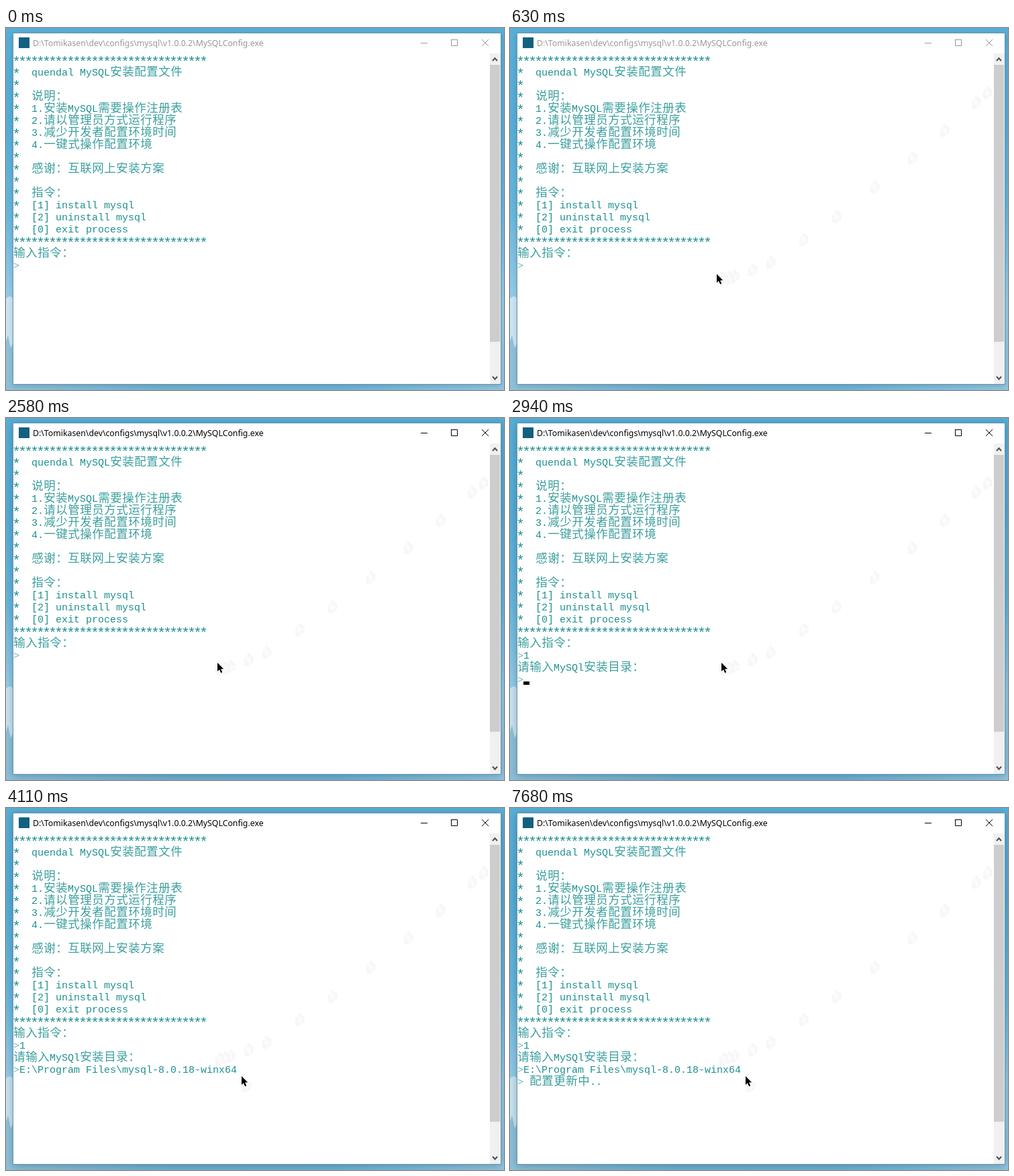
These frames come from a looping animation (742 px wide and 540 px high, 8000 ms). An HTML page with a canvas:

```html
<!DOCTYPE html>
<html lang="zh-CN">
<meta charset="utf-8">
<title>MySQLConfig</title>
<style>
html, body { margin: 0; width: 100%; height: 100%; overflow: hidden; }
canvas { display: block; }
</style>
<canvas id="stage" width="742" height="540"></canvas>
<script>
const ctx = document.getElementById('stage').getContext('2d');
const LOOP = 8000, STEP = 30, BLINK = 515, FOCUS = 2070;
const CELL = 9, ROW = 18, LEFT = 11, TOP = 38;
const STARS = '*'.repeat(32);
const INTRO = `${STARS}
*  quendal MySQL安装配置文件
*
*  说明：
*  1.安装MySQL需要操作注册表
*  2.请以管理员方式运行程序
*  3.减少开发者配置环境时间
*  4.一键式操作配置环境
*
*  感谢：互联网上安装方案
*
*  指令：
*  [1] install mysql
*  [2] uninstall mysql
*  [0] exit process
${STARS}
输入指令：
>`;

// Text added to the console; every entry also restarts the caret blink
const OUTPUT = [
  [0, INTRO], [2065, ''], [2610, '1'], [2910, '\n'],
  [2940, '请输入MySQl安装目录：\n>'],
  [3590, 'E:\\Program Files\\mysql-8.0.18-winx64'],
  [4740, '\n> 配置更新中..\n'], [5087, '']
];

// Pointer key points: time, x, y
const KEYS = [[90, 740, 59], [180, 689, 101], [240, 594, 184], [300, 481, 272],
  [360, 383, 340], [420, 329, 361], [480, 313, 364], [630, 307, 366], [780, 304, 365],
  [1950, 304, 365], [2040, 314, 364], [3360, 314, 364], [3540, 353, 405], [3690, 350, 399]];
const ARROW = [[0, 0], [0, 14], [3.2, 11.2], [5.6, 16.6], [8, 15.5], [5.6, 10.3], [10, 10]];
const MARK = [[-1, 9], [5, -1], [13, 6], [12, 14], [4, 20], [-1, 18]];

function rect(color, x, y, w, h) {
  ctx.fillStyle = color;
  ctx.fillRect(x, y, w, h);
}

function path(points) {
  ctx.beginPath();
  points.forEach(([x, y]) => ctx.lineTo(x, y));
}

function fill(color, points) {
  path(points);
  ctx.fillStyle = color;
  ctx.fill();
}

function stroke(color, width, points) {
  path(points);
  ctx.strokeStyle = color;
  ctx.lineWidth = width;
  ctx.stroke();
}

const shift = (points, [x, y], scale = 1) => points.map(([a, b]) => [x + a * scale, y + b * scale]);

function gradient(x, y, ...colors) {
  const g = ctx.createLinearGradient(0, 0, x, y);
  colors.forEach((c, i) => g.addColorStop(i / (colors.length - 1), c));
  return g;
}

function backdrop() {
  rect(gradient(0, 540, '#58aed6', '#56acd5', '#66b5db', '#96cbe6', '#92c3dd'), 0, 0, 742, 540);
  fill('#cbe4f0', [[0, 403], [6, 400], [12, 404], [12, 490], [0, 470]]);
  fill('#8fbfd6', [[0, 468], [3, 458], [7, 478], [12, 466], [12, 540], [0, 540]]);
  rect(gradient(742, 0, '#8fbfd8', '#72b1d0', '#6fb2d4', '#92c5df'), 0, 531, 742, 9);
}

function frame(active) {
  ctx.save();
  ctx.shadowColor = `rgba(0,40,70,${active ? .3 : .2})`;
  ctx.shadowBlur = active ? 12 : 7;
  ctx.shadowOffsetY = 2;
  rect('#6497ae', 10, 7, 728, 525);
  ctx.restore();
  rect('#fff', 11, 8, 726, 523);
  rect('#14607f', 19, 14, 16, 16);

  const ink = active ? '#000' : '#999';
  ctx.fillStyle = ink;
  ctx.textAlign = 'left';
  ctx.font = '12.3px "Noto Sans", "Open Sans", sans-serif';
  ctx.fillText('D:\\Tomikasen\\dev\\configs\\mysql\\v1.0.0.2\\MySQLConfig.exe', 40, 27);
  rect(ink, 618, 22, 10, 1);
  stroke(ink, 1, [[663.5, 17.5], [672.5, 17.5], [672.5, 26.5], [663.5, 26.5], [663.5, 17]]);
  stroke(ink, 1, [[709, 17], [719, 27]]);
  stroke(ink, 1, [[719, 17], [709, 27]]);
}

function scrollbar(hover) {
  rect('#f0f0f0', 721, 38, 16, 493);
  rect(hover ? '#bababa' : '#cdcdcd', 721, 55, 15, 413);
  for (const [y, d] of [[49, -4], [520, 4]])
    stroke('#505050', 2, [[725, y], [728.5, y + d], [732, y]]);
}

const isWide = ch => ch > '\u2fff';

function line(text, row) {
  let x = LEFT;
  const base = TOP + row * ROW + 15;
  ctx.textAlign = 'center';
  for (const ch of text) {
    const wide = isWide(ch), star = ch === '*', width = wide ? 2 * CELL : CELL;
    ctx.fillStyle = wide ? '#3d9f9f' : ch === '>' ? '#70b8b8' : '#1f8f8f';
    ctx.font = wide ? '300 17.5px "Noto Sans CJK SC", "Noto Sans CJK", sans-serif'
      : `${star ? 21 : 15}px "Liberation Mono", monospace`;
    ctx.fillText(ch, x + width / 2, star ? base + 4 : base);
    x += width;
  }
  return x;
}

function consoleText(t) {
  const shown = OUTPUT.filter(([at]) => at <= t);
  const lines = shown.map(([, text]) => text).join('').split('\n');
  const ends = lines.map(line);
  const since = t - shown[shown.length - 1][0];
  if (t >= FOCUS && Math.floor(since / BLINK) % 2 === 0)
    rect('#000', ends[ends.length - 1], TOP + lines.length * ROW - 5, CELL, 5);
}

function pointerAt(t) {
  const s = Math.floor(t / STEP) * STEP;
  const next = KEYS.findIndex(k => k[0] > s);
  if (next < 0) return KEYS[KEYS.length - 1].slice(1);
  const [t0, x0, y0] = KEYS[next - 1], [t1, x1, y1] = KEYS[next];
  const p = (s - t0) / (t1 - t0);
  return [x0 + (x1 - x0) * p, y0 + (y1 - y0) * p].map(Math.round);
}

function mark(at) {
  fill('#f7f7f7', shift(MARK, at));
  fill('#fcfcfc', shift(ARROW, [at[0] + 2, at[1] + 2], .9));
}

// Faint marks left behind by the pointer
function trail(t) {
  for (let s = 150; s <= 480 && s < t; s += STEP) mark(pointerAt(s));
  if (t > 3540) mark(pointerAt(3540));
}

function pointer(at) {
  const shape = shift(ARROW, [at[0] + 1, at[1] + 1], .92);
  stroke('#fff', 2, [...shape, shape[0]]);
  fill('#000', shape);
}

function draw() {
  const t = performance.now() % LOOP;
  const tip = t >= 90 && pointerAt(t);
  backdrop();
  frame(t >= FOCUS);
  trail(t);
  scrollbar(tip && tip[0] > 720);
  consoleText(t);
  if (tip) pointer(tip);
  requestAnimationFrame(draw);
}
draw();
</script>
</html>
```
